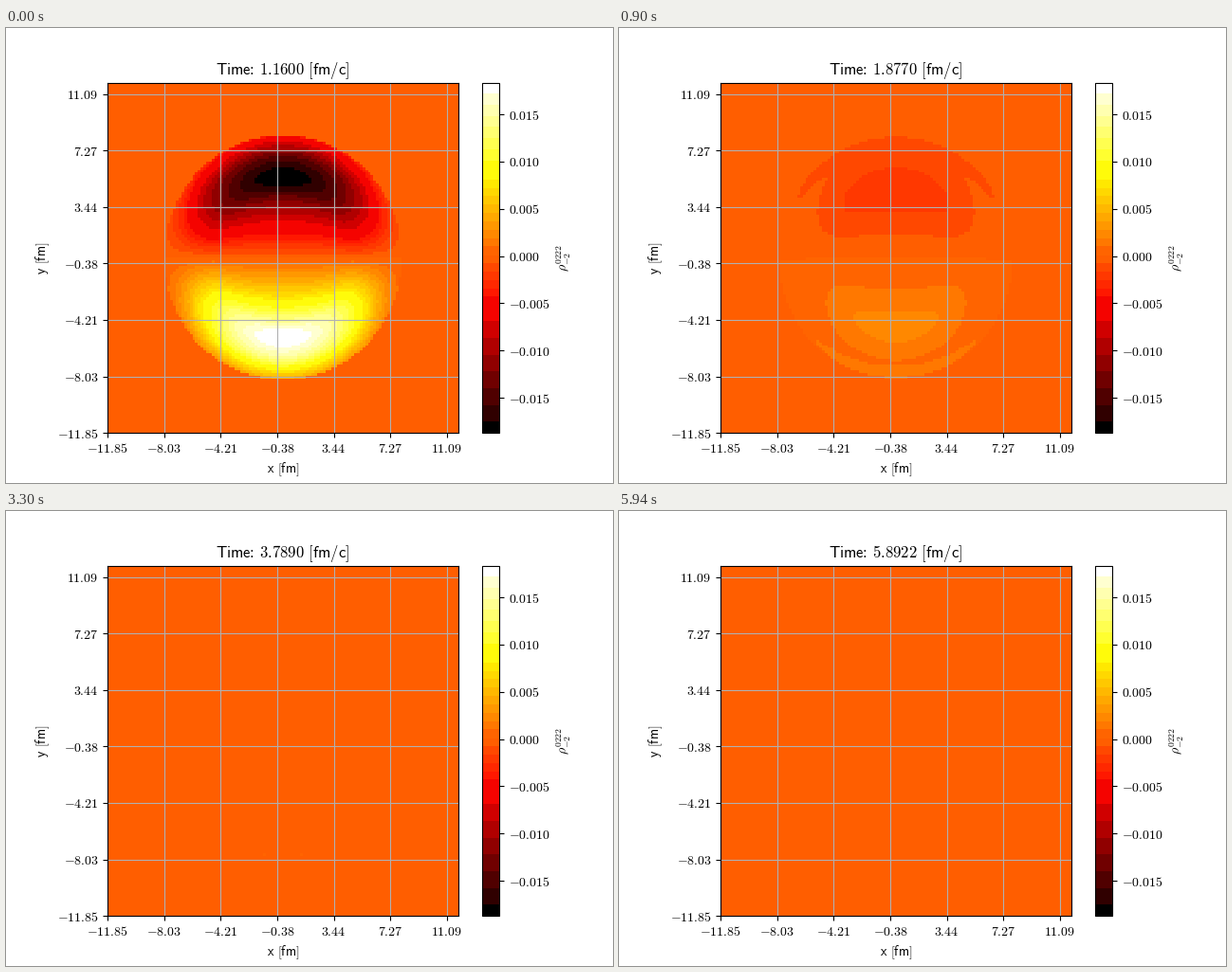
Animation of 640x480 px, one loop 6 s. Source, as a matplotlib script:

```python
import numpy as np
import matplotlib.pyplot as plt
from matplotlib.animation import FuncAnimation
from matplotlib.colors import BoundaryNorm, ListedColormap

plt.rcParams["mathtext.fontset"] = "cm"

FRAMES, INTERVAL = 100, 60
T0, DT = 1.16, 0.0478
CELLS, CELL = 124, 0.1912
HALF = CELLS * CELL / 2
VMIN, VMAX = -0.01872, 0.01836
FAINT = 2.2e-5  # smallest positive value that shows


def hot_bands():
    """Value edges and colours of a banded 'hot' colour scale."""
    red = (32 * np.arange(1, 8) / 255 - 0.0416) / 0.9584 * 0.365079
    green = 0.365079 + 0.380953 * 16 * np.arange(1, 16) / 255
    blue = 0.746032 + 0.253968 * 32 * np.arange(1, 8) / 255
    pos = np.concatenate([[0], red, green, blue, [1]])
    edges = VMIN + pos * (VMAX - VMIN)
    edges[13] = FAINT

    greens = [8 + 16 * k for k in range(1, 15)]
    greens[4:6] = 94, 100
    colors = [(0, 0, 0)]
    colors += [(16 + 32 * k, 0, 0) for k in range(1, 7)]
    colors += [(245, 3, 0)]
    colors += [(255, g, 0) for g in greens]
    colors += [(255, 251, 10)]
    colors += [(255, 255, 16 + 32 * k) for k in range(1, 7)]
    colors += [(255, 255, 255)]
    return edges, ListedColormap(np.array(colors) / 255)


def smooth_curve(r, knots, values, width=0.2):
    shifts = np.linspace(-width, width, 7)
    return sum(np.interp(np.abs(r + d), knots, values) for d in shifts) / 7


def sans(text):
    return r"$\mathsf{" + text + "}$"


def roman(text):
    return r"$\mathrm{" + text + "}$"


def title_text(n):
    # cancel the relation spacing around the colon
    return sans(r"Time\hspace{-0.2}:\hspace{0.18}"
                + f"{T0 + DT * n:.4f}" + r"\hspace{0.38}[fm/c]")


axis = np.linspace(-HALF + CELL / 2, HALF - CELL / 2, CELLS)
X, Y = np.meshgrid(axis, axis)
R = np.hypot(1.03 * X, Y)

profile = smooth_curve(
    R,
    [0, 2.6, 3.85, 4.8, 5.4, 5.8, 6.1, 6.75, 7.5, 7.95, 8.3, 8.7],
    [2.77, 2.8, 3.2, 3.67, 3.47, 3.15, 2.86, 2.19, 1.22, 0.79, 0.44, 0.15])
rate = smooth_curve(
    R,
    [0, 3.2, 4.5, 5.4, 6.3, 7.05, 7.45, 7.77, 8.0, 8.4],
    [0.115, 0.115, 0.126, 0.143, 0.163, 0.172, 0.15, 0.105, 0.092, 0.09])

start = -Y * profile
start /= start.max()
start *= np.where(start > 0, VMAX, -VMIN)


def field(n):
    inside = R < 8.28 - 0.0077 * n
    return np.where(inside, start * np.exp(-rate * n), 0)


edges, cmap = hot_bands()
fig, ax = plt.subplots(figsize=(6.4, 4.8), dpi=100)
image = ax.imshow(field(0), origin="lower", extent=[-HALF, HALF, -HALF, HALF],
                  cmap=cmap, norm=BoundaryNorm(edges, cmap.N),
                  interpolation="nearest")

bar = fig.colorbar(image, ax=ax, spacing="proportional")
levels = [0.005 * k for k in range(-3, 4)]
bar.set_ticks(levels, labels=[roman(f"{v:.3f}") for v in levels])
bar.minorticks_off()
bar.set_label(r"$\rho^{\mathrm{0222}}_{\mathrm{-2}}$")

ticks = -HALF + 20 * CELL * np.arange(7)
labels = [roman(f"{v:.2f}") for v in ticks]
ax.set_xticks(ticks, labels)
ax.set_yticks(ticks, labels)
ax.set_xlabel(sans(r"x\hspace{0.38}[fm]"))
ax.set_ylabel(sans(r"y\hspace{0.38}[fm]"))
ax.grid(True)
title = ax.set_title(title_text(0))


def update(n):
    image.set_data(field(n))
    title.set_text(title_text(n))
    return image, title


anim = FuncAnimation(fig, update, frames=FRAMES, interval=INTERVAL,
                     init_func=lambda: update(0), repeat=True, repeat_delay=0)
plt.show()
```
